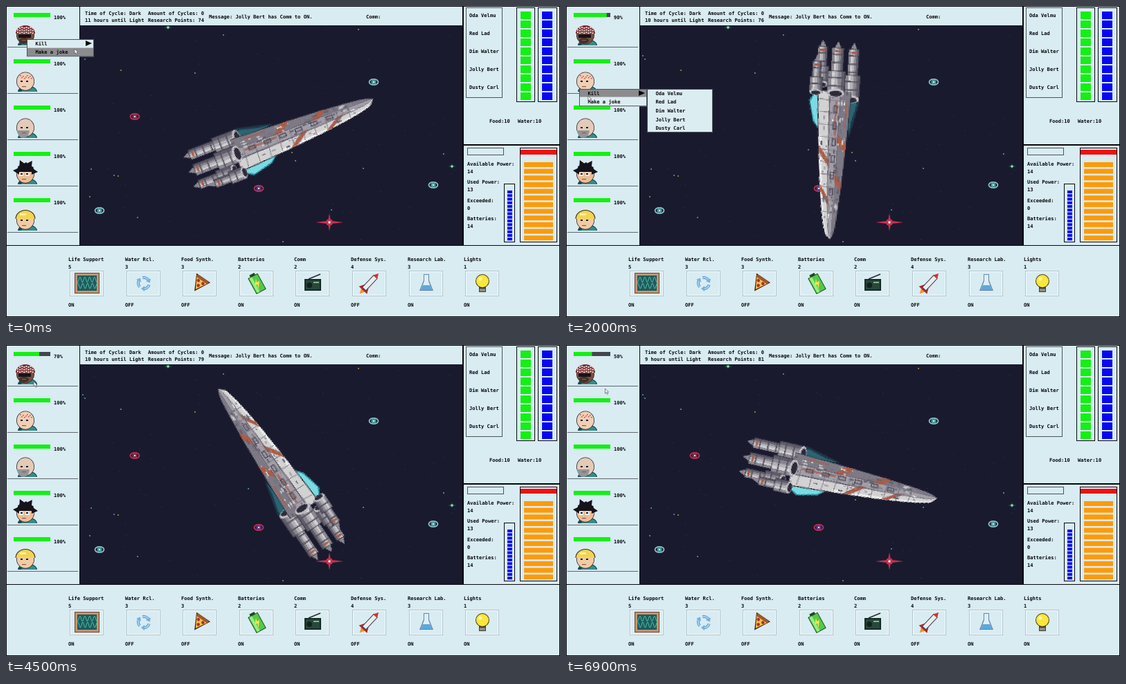
Animation, 800 px wide and 450 px high, one loop 7 s. Source, as an HTML page with a canvas:

```html
<!DOCTYPE html>
<html lang="en">
<head>
<meta charset="utf-8">
<title>Space station console</title>
<style>
html, body { margin: 0; width: 100%; height: 100%; overflow: hidden; background: #d8ecf2; }
canvas { display: block; width: 800px; height: 450px; }
</style>
</head>
<body>
<canvas id="stage" width="800" height="450"></canvas>
<script>
const LOOP = 7000, STEP = 100;
const PANEL = '#d8ecf2', SPACE = '#1a1a2f', GREEN = '#14f014', BLUE = '#0808f0', INK = '#08080c', EDGE = '#4c5458';
const CREW = ['Oda Velmu', 'Red Lad', 'Dim Walter', 'Jolly Bert', 'Dusty Carl'];
const ACTIONS = ['Kill', 'Make a joke'];
const stage = document.getElementById('stage').getContext('2d');
let g = stage;

function rect(color, x, y, w, h) {
  g.fillStyle = color;
  g.fillRect(x, y, w, h);
}
function frame(color, x, y, w, h, width = 1) {
  g.strokeStyle = color;
  g.lineWidth = width;
  g.strokeRect(x + width / 2, y + width / 2, w - width, h - width);
}
function trace(points) {
  g.beginPath();
  for (let i = 0; i < points.length; i += 2) g.lineTo(points[i], points[i + 1]);
}
function poly(color, ...points) {
  trace(points);
  g.fillStyle = color;
  g.fill();
}
function line(color, width, ...points) {
  trace(points);
  g.strokeStyle = color;
  g.lineWidth = width;
  g.stroke();
}
function oval(color, x, y, rx, ry = rx, from = 0, to = Math.PI * 2) {
  g.beginPath();
  g.ellipse(x, y, rx, ry, 0, from, to);
  g.fillStyle = color;
  g.fill();
}
function ring(color, width, rx, ry = rx, from = 0, to = Math.PI * 2) {
  g.beginPath();
  g.ellipse(0, 0, rx, ry, 0, from, to);
  g.strokeStyle = color;
  g.lineWidth = width;
  g.stroke();
}
function text(s, x, y) {
  g.font = 'bold 7.1px "DejaVu Sans Mono", monospace';
  g.fillStyle = INK;
  g.fillText(s, x, y);
}
function at(x, y, angle, draw) {
  g.save();
  g.translate(x, y);
  g.rotate(angle);
  draw();
  g.restore();
}
function stack(color, count, x, y, w, h, pitch) {
  for (let i = 0; i < count; i++) rect(color, x, y + i * pitch, w, h);
}
function random(seed) {
  return () => (seed = seed * 16807 % 2147483647) / 2147483647;
}

// Space

function eyeStar(x, y, color, core) {
  at(x, y, 0, () => {
    ring(color, 1.8, 6.5, 4.2);
    oval(core, 0, 0, 3.6);
    rect('#d8f0f0', -1, -1, 2, 2);
  });
}
function crossStar(x, y, size, color, core) {
  at(x, y, 0, () => {
    for (let i = 0; i < 4; i++) {
      const reach = i % 2 ? size * 0.65 : size;
      at(0, 0, i * Math.PI / 2, () => poly(color, 0, -size / 8, reach, 0, 0, size / 8));
    }
    rect(color, -size / 5, -size / 5, size / 2.5, size / 2.5);
    rect(core, -1.5, -1.5, 3, 3);
  });
}
function drawSpace() {
  rect(SPACE, 107, 28, 553, 318);
  const rnd = random(77);
  for (let i = 0; i < 90; i++) {
    const size = i % 5 ? 1 : 2;
    const color = size < 2 ? '#33354b' : i % 2 ? '#8a753f' : '#457f8c';
    rect(color, 110 + rnd() * 546 | 0, 32 + rnd() * 310 | 0, size, size);
  }
  crossStar(234, 31, 6, '#2c8a55', '#8ae8a0');
  crossStar(644, 232, 6, '#2c8a55', '#8ae8a0');
  eyeStar(186, 160, '#c03450', '#8a2c58');
  eyeStar(365, 264, '#c03450', '#6a3890');
  eyeStar(135, 296, '#86c4c8', '#4a9a9c');
  eyeStar(531, 110, '#86c4c8', '#4a9a9c');
  eyeStar(617, 259, '#86c4c8', '#4a9a9c');
  crossStar(467, 313, 20, '#c8304c', '#fff0f0');
}

// Ship: drawn once with its nose along +x, then rotated

const SHIP_SCALE = 0.7, SHIP_X = 142, SHIP_Y = 46, NOSE = 150, STERN = -64;

// Side runs from -1 (port edge) to 1 (starboard edge)
function hullY(x, side) {
  const p = Math.max(0, NOSE - x) / (NOSE - STERN);
  return side < 0 ? side * 18 * Math.sqrt(p) : side * 29 * Math.pow(p, 0.4);
}
function band(color, from, to, start = STERN, end = NOSE, slant = 0) {
  const points = [];
  for (let i = 0; i <= 24; i++) {
    const x = start + (end - start) * i / 24;
    points.push(x, hullY(x, from));
    points.unshift(x - slant, hullY(x - slant, to));
  }
  poly(color, ...points);
}
function tube(x, y, length, h) {
  rect('#34323f', x - 1, y - h / 2 - 1, length + 2, h + 2);
  ['#605d6a', '#87848f', '#b4b2b8', '#d2d1d3', '#8d8a94'].forEach((color, i) =>
    rect(color, x, y - h / 2 + i * h / 5, length, h / 5 + 0.3));
  for (let i = 8; i < length - 4; i += 12) rect('#55525f', x + i, y - h / 2, 2, h);
}
function engine(y, back, front, thick) {
  const mid = back + (front - back) * 0.52;
  poly('#8d8890', back - 10, y, back, y - 5, back, y + 5);
  tube(back, y, mid - back, thick * 0.66);
  rect('#a85a44', back + 3, y - 4, 3, 8);
  tube(mid, y, front - mid, thick);
  oval('#c4c2c8', front, y, thick * 0.26, thick * 0.52);
  oval('#2d2b38', front + 1, y, thick * 0.18, thick * 0.38);
}
function wing(color, side, inset) {
  const reach = side < 0 ? 31 : 42;
  poly(color, 2 - inset, side * 18, -20, side * (reach - 7 - inset), -50 + inset, side * (reach - inset),
    -62 + inset, side * (reach - 8), -56, side * 12);
}
function drawShip() {
  wing('#1c3a48', -1, 0);
  wing('#2c6472', -1, 4);
  wing('#2f8fa0', 1, 0);
  wing('#7adbe2', 1, 2);
  engine(26, -128, -74, 19);
  engine(-19, -126, -54, 21);

  band('#34323f', -1.06, 1.05);
  band('#7d7a86', -1, -0.2);
  band('#a19ea8', -0.2, 0.4);
  band('#d3d2d3', 0.4, 1);
  band('#efefee', 0.85, 1, 0);

  const rust = '#ac5c46';
  for (const x of [36, 92]) {
    band(rust, 0.35, 1, x, x + 11, 22);
    band(rust, -1, -0.1, x - 24, x - 10, 16);
  }
  band(rust, 0.05, 0.13, -50, 0);
  band(rust, -0.8, -0.7, -46, -12);
  for (const side of [-0.2, 0.4]) band('#5f5c69', side, side + 0.06);

  const rnd = random(31), greys = ['#625f6b', '#8e8b94', '#e0dfdf', '#716e79'];
  for (let i = 0; i < 80; i++) {
    const x = STERN + rnd() * 185;
    rect(greys[i % 4], x, hullY(x, rnd() * 1.75 - 0.9), 2 + rnd() * 6, i % 4 ? 1.6 : 2.4);
  }
  for (let x = -50; x < 125; x += 18) band('#77747f', -1, 0.95, x, x + 1, 3);
  for (let x = -44; x < 80; x += 24) frame('#4d4a57', x, 0, 11, 6, 1.5);

  engine(33, -106, -62, 17);
  engine(4, -127, -62, 24);
}

// Crew portraits, centred on the head

const SKIN = ['#76503f', '#efcfb6', '#e4cbb8', '#ecbd94', '#f2cba4'];
const hair = [
  () => {
    oval('#7c2c30', 0, -2, 14, 12, Math.PI, 0);
    for (let i = 0; i < 24; i++) rect('#f0dfda', -12 + i % 8 * 3.1, -12 + (i / 8 | 0) * 3.6 + i % 2, 2, 2);
    rect('#171416', -10, -1, 18, 5);
    oval('#45302a', -2, 8, 7, 4);
  },
  () => {
    for (let i = 0; i < 9; i++) rect('#c65a5a', -8 + i * 2, -9 + i * 3 % 5, 1.8, 1.5);
  },
  () => oval('#94949a', -3, 4, 9, 11, 0, Math.PI),
  () => {
    oval('#15131c', 0, -3, 13, 11, Math.PI, 0);
    for (let i = 0; i < 7; i++) {
      at(0, -4, i * Math.PI / 6, () => poly('#15131c', -9, -5, i % 2 ? -13 : -18, -1, -9, 5));
    }
    for (const x of [-9, 0]) rect('#f4f0ec', x, -2, 6, 5);
  },
  () => {
    oval('#3a3018', 0, -2, 14.5, 13, Math.PI, 0);
    oval('#f2d454', 0, -2, 13.3, 12, Math.PI, 0);
    rect('#fff09a', -8, -10, 9, 3);
  }
];
function drawFace(i, y) {
  at(28, y, 0, () => {
    oval('#174f55', 3, 15, 14, 9, Math.PI, 0);
    oval('#3a8a88', 5, 15, 11, 7, Math.PI, 0);
    oval('#33292a', 0, 0, 13, 13.5);
    oval(SKIN[i], 0, 0, 12.2, 12.7);
    hair[i]();
    if (i) for (const x of [-7, 1]) rect('#201a1c', x, -1, 3, 2);
    rect('#8a5a4c', -5, 7, 6, 1.2);
  });
}

// System icons, centred on the origin

const icons = [
  () => {
    rect('#6b4634', -18, -15, 36, 30);
    rect('#c49470', -17, -14, 34, 28);
    rect('#1f5a60', -14, -11, 28, 22);
    for (const y of [-5, 4]) {
      const wave = [];
      for (let x = -14; x <= 14; x++) wave.push(x, y + 4 * Math.sin(x * 0.9 + y));
      line('#48c39a', 1, ...wave);
    }
  },
  () => {
    for (let i = 0; i < 3; i++) at(0, 0, i * Math.PI * 2 / 3, () => {
      ring('#5a94cc', 4, 8, 8, 0.3, 1.6);
      ring('#a8d2f0', 2, 8, 8, 0.3, 1.6);
      poly('#78b0e0', 1, 4, 1, 12, -4, 8);
    });
  },
  () => at(0, 0, 0.6, () => {
    poly('#3c1c14', -12, -9, 12, -9, 0, 14);
    poly('#f0bc50', -9, -5, 9, -5, 0, 11);
    rect('#9a5a2c', -10, -9, 20, 4);
    for (let i = 0; i < 3; i++) oval('#b03024', i * 4 - 4, i % 2 * 6 - 2, 2.3);
  }),
  () => at(0, 0, -0.5, () => {
    rect('#1c4b24', -8, -12, 16, 26);
    rect('#1c4b24', -4, -15, 8, 4);
    rect('#54c84a', -7, -11, 14, 24);
    rect('#9aec80', -6, -11, 4, 24);
    poly('#f5e24e', 2, -6, -4, 2, 0, 2, -2, 9, 5, -1, 1, -1);
  }),
  () => {
    line('#252b28', 1.5, -6, -6, 11, -13);
    rect('#182a24', -12, -6, 24, 17);
    rect('#28483c', -10, -4, 20, 13);
    oval('#14211d', -5, 3, 4);
    rect('#8ab090', 1, -2, 8, 2);
  },
  () => at(0, 0, 0.75, () => {
    poly('#f0902c', -5, 11, 5, 11, 0, 21);
    poly('#b02828', -2, 3, -8, 14, 8, 14, 2, 3);
    rect('#44424c', -4, -13, 8, 25);
    rect('#ececee', -3, -12, 6, 23);
    poly('#d03434', -4, -12, 0, -19, 4, -12);
  }),
  () => {
    poly('#6888a4', -4, -13, 4, -13, 4, -4, 10, 11, -10, 11, -4, -4);
    poly('#dceff8', -3, -12, 3, -12, 3, -3, 8, 10, -8, 10, -3, -3);
    poly('#5aa8dc', -5, 3, 5, 3, 8, 10, -8, 10);
  },
  () => {
    rect('#4c401a', -5, 4, 10, 9);
    oval('#4c401a', 0, -3, 10);
    oval('#fbe63c', 0, -3, 9);
    rect('#8a8d90', -4, 8, 8, 4);
    oval('#fff7ac', -3, -6, 2.5);
  }
];
const SYSTEMS = [
  ['Life Support', 5, 'ON'], ['Water Rcl.', 3, 'OFF'], ['Food Synth.', 3, 'OFF'], ['Batteries', 2, 'ON'],
  ['Comm', 2, 'ON'], ['Defense Sys.', 4, 'OFF'], ['Research Lab.', 3, 'ON'], ['Lights', 1, 'ON']
];
const POWER = [['Available Power:', 14], ['Used Power:', 13], ['Exceeded:', 0], ['Batteries:', 14]];

function drawPanels() {
  rect(PANEL, 0, 0, 800, 450);
  drawSpace();
  frame(INK, 0, 0, 800, 450);
  rect(INK, 106, 0, 1, 346);
  rect(INK, 659, 0, 2, 346);
  rect(INK, 0, 346, 800, 1);
  rect(INK, 660, 200, 140, 2);

  CREW.forEach((name, i) => {
    const y = i * 67;
    rect('#60686c', 2, 59 + y, 102, 1);
    drawFace(i, 42 + y);
    rect(GREEN, 11, 10 + y, 53, 6);
    if (i) text('100%', 69, 19 + y);
    text(name, 669, 16 + i * 26);
  });

  text('Time of Cycle: Dark', 114, 13);
  text('Amount of Cycles: 0', 205, 13);
  text('Message: ' + CREW[3] + ' has Comm to ON.', 293, 18);
  text('Comm:', 520, 18);

  frame(EDGE, 664, 2, 53, 131);
  frame(INK, 737, 2, 27, 137);
  frame(INK, 768, 2, 28, 137);
  stack(GREEN, 10, 743, 8, 15, 11, 13);
  stack(BLUE, 10, 774, 8, 15, 11, 13);
  text('Food:10', 698, 169);
  text('Water:10', 739, 169);

  frame(EDGE, 666, 205, 53, 11);
  POWER.forEach(([label, amount], i) => {
    const y = 231 + Math.round(i * 26.3);
    text(label, 666, y);
    text(amount, 666, y + 11);
  });
  frame(INK, 719, 257, 16, 85);
  stack(BLUE, 14, 724, 267, 7, 4, 5.25);
  frame(INK, 742, 205, 54, 137);
  rect('#f01010', 743, 208, 52, 7);
  stack('#ff9a08', 12, 748, 226, 42, 7, 9.65);

  SYSTEMS.forEach(([name, level, state], i) => {
    const x = Math.round(90 + i * 81.6);
    text(name, x, 369);
    text(level, x, 380);
    text(state, x, 435);
    frame('#b4c4ca', x + 2, 383, 49, 37);
    frame('#f6fcfe', x + 3, 384, 47, 35);
    at(x + 27, 401, 0, icons[i]);
  });
}

function menu(x, y, w, rows, selected) {
  const h = 12.6;
  rect('#dcedf2', x, y, w, rows.length * h);
  if (selected >= 0) rect('#8c8c8e', x, y + selected * h, w, h - 1);
  frame(EDGE, x, y, w, rows.length * h);
  rows.forEach((row, i) => text(row, x + 12.5, y + 8.7 + i * h));
  if (rows === ACTIONS) poly(INK, x + w - 12, y + 2, x + w - 3, y + 6, x + w - 12, y + 10);
}

// Where the pointer rests: time, x, y
const POINTER = [
  [0, 99, 62], [900, 99, 62], [1500, 19, 119], [2000, 32, 130],
  [3700, 51, 54], [4500, 40, 53], [5900, 329, 26], [LOOP, 50, 64]
];
function pointerAt(t) {
  const next = Math.max(1, POINTER.findIndex(key => key[0] >= t));
  const [t0, x0, y0] = POINTER[next - 1], [t1, x1, y1] = POINTER[next];
  const p = (t - t0) / (t1 - t0), ease = p * p * (3 - 2 * p);
  return [x0 + (x1 - x0) * ease, y0 + (y1 - y0) * ease];
}
const ticks = (t, first, period) => Math.max(0, Math.floor((t - first) / period) + 1);

function prerender(w, h, draw) {
  const c = document.createElement('canvas');
  c.width = w;
  c.height = h;
  g = c.getContext('2d');
  draw();
  g = stage;
  return c;
}
const backdrop = prerender(800, 450, drawPanels);
const ship = prerender(210, 70, () => {
  g.scale(SHIP_SCALE, SHIP_SCALE);
  g.translate(SHIP_X, SHIP_Y);
  drawShip();
});

function draw(t) {
  g.drawImage(backdrop, 0, 0);
  at(390, 188, (-21 + t * 0.0571) * Math.PI / 180, () => {
    g.imageSmoothingEnabled = false;
    g.drawImage(ship, -SHIP_X, -SHIP_Y, ship.width / SHIP_SCALE, ship.height / SHIP_SCALE);
  });

  text(11 - ticks(t, 300, 6300) + ' hours until Light', 114, 23);
  text('Research Points: ' + (74 + ticks(t, 250, 1050)), 205, 23);

  const health = 100 - 10 * ticks(t, 1750, 1200);
  const lost = 53 * (1 - health / 100);
  rect('#42484a', 64 - lost, 10, lost, 6);
  text(health + '%', 69, 19);

  if (t < 1100) menu(30, 48, 97, ACTIONS, 1);
  if (t >= 1500 && t < 2500) menu(19, 120, 98, ACTIONS, 0);
  if (t >= 1700 && t < 2500) menu(117, 120, 95, CREW, -1);

  at(...pointerAt(t), 0, () => {
    const arrow = [0, 0, 0, 7, 1.7, 5.6, 3, 8.2, 4.3, 7.6, 3.1, 5, 5, 5, 0, 0];
    poly('#f4fafc', ...arrow);
    line('#55585c', 0.7, ...arrow);
  });
}

const start = performance.now();
function tick() {
  const t = (performance.now() - start) % LOOP;
  draw(Math.floor(t / STEP) * STEP);
  requestAnimationFrame(tick);
}
tick();
</script>
</body>
</html>
```
